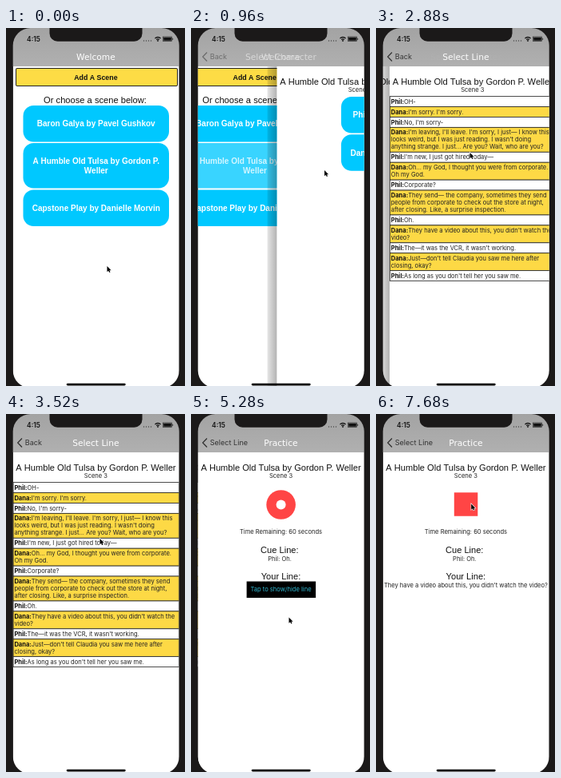
Write an HTML page with a canvas that moves like this. It is 224 by 448 pixels and loops after 8 s.

```html
<!DOCTYPE html>
<html lang="en">
<head>
<meta charset="utf-8">
<title>Line practice app</title>
<style>
  html, body { margin: 0; width: 100%; height: 100%; overflow: hidden; background: #1b1919; }
  canvas { display: block; width: 224px; height: 448px; }
</style>
</head>
<body>
<canvas id="stage"></canvas>
<script>
const LOOP = 8000, W = 224, H = 448;
const SCREEN = { x: 8.7, y: 0, w: 208, h: 450.5, r: 22 };
const HEADER_BOTTOM = 48, MID = 112.4;
const SANS = '"Liberation Sans", Arial, sans-serif';
const SYSTEM = 'Inter, sans-serif';
const TITLE = '"DejaVu Sans", Verdana, sans-serif';
const BLUE = '#00c8ff', YELLOW = '#fdd945', RED = '#ff4545', INK = '#111', BEZEL = '#1b1919';
const BODY = 7.55;

const PLAY = 'A Humble Old Tulsa by Gordon P. Weller';
const LINES = [
  ['Phil', 'OH-'],
  ['Dana', "I'm sorry. I'm sorry."],
  ['Phil', "No, I'm sorry-"],
  ['Dana', "I'm leaving, I'll leave. I'm sorry, I just— I know this|looks weird, but I was just reading. I wasn't doing|anything strange. I just... Are you? Wait, who are you?"],
  ['Phil', "I'm new, I just got hired today—"],
  ['Dana', 'Oh... my God, I thought you were from corporate.|Oh my God.'],
  ['Phil', 'Corporate?'],
  ['Dana', 'They send— the company, sometimes they send|people from corporate to check out the store at night,|after closing. Like, a surprise inspection.'],
  ['Phil', 'Oh.'],
  ['Dana', "They have a video about this, you didn't watch the|video?"],
  ['Phil', "The—it was the VCR, it wasn't working."],
  ['Dana', "Just—don't tell Claudia you saw me here after|closing, okay?"],
  ['Phil', "As long as you don't tell her you saw me."]
];

const canvas = document.getElementById('stage');
const ctx = canvas.getContext('2d');
const ratio = window.devicePixelRatio || 1;
canvas.width = W * ratio;
canvas.height = H * ratio;

const clamp = v => Math.min(1, Math.max(0, v));
const smooth = v => v * v * (3 - 2 * v);

// Cubic bezier easing, solved by bisection
function slideEase(x) {
  if (x <= 0 || x >= 1) return clamp(x);
  const curve = (u, a, b) => 3 * (1 - u) ** 2 * u * a + 3 * (1 - u) * u * u * b + u ** 3;
  let lo = 0, hi = 1;
  for (let i = 0; i < 24; i++) {
    const mid = (lo + hi) / 2;
    if (curve(mid, 0.2833, 0.3183) < x) lo = mid; else hi = mid;
  }
  return curve(lo, 0.99, 0.99);
}

// Opacity of a touchable held between down and up
function touch(t, down, up) {
  const held = smooth(clamp((t - down) / 150));
  const freed = smooth(clamp((t - up) / 250));
  return 1 - 0.77 * held * (1 - freed);
}

function faded(alpha, draw) {
  ctx.save();
  ctx.globalAlpha *= alpha;
  draw();
  ctx.restore();
}

// Draws vertically centred text and returns its width
function text(str, x, cy, size, { color = INK, align = 'center', weight = 400, font = SANS } = {}) {
  ctx.font = `${weight} ${size}px ${font}`;
  ctx.textAlign = align;
  ctx.fillStyle = color;
  ctx.fillText(str, x, cy + size * 0.35);
  return ctx.measureText(str).width;
}

function bodyText(str, x, cy, style) {
  return text(str, x, cy, BODY, { color: '#222', font: SYSTEM, ...style });
}

function box(x, y, w, h, r, color) {
  ctx.beginPath();
  ctx.roundRect(x, y, w, h, r);
  ctx.fillStyle = color;
  ctx.fill();
}

function disc(x, y, r, color) {
  ctx.beginPath();
  ctx.arc(x, y, r, 0, 7);
  ctx.fillStyle = color;
  ctx.fill();
}

function blueButton(x, y, w, h, labels, alpha = 1) {
  faded(alpha, () => {
    box(x, y, w, h, 13, BLUE);
    labels.forEach((label, i) =>
      text(label, x + w / 2, y + h / 2 + (i - (labels.length - 1) / 2) * 11.5, 10, { color: '#fff', weight: 700 }));
  });
}

function sceneTitle() {
  text(PLAY, MID, 67.5, 11.1);
  bodyText('Scene 3', MID, 77.8);
}

function welcomePage(t) {
  box(12, 50, 203, 23, 2, '#222');
  box(13, 51, 201, 21, 1, '#fddc45');
  text('Add A Scene', MID, 61.5, 8.8, { weight: 700 });
  text('Or choose a scene below:', 111.5, 90, 11.15);
  blueButton(21.5, 97, 182.5, 45.5, ['Baron Galya by Pavel Gushkov']);
  blueButton(21.5, 144, 182.5, 56.5, ['A Humble Old Tulsa by Gordon P.', 'Weller'], touch(t, 540, 800));
  blueButton(21.5, 202.5, 182.5, 45.5, ['Capstone Play by Danielle Morvin']);
}

function characterPage(t) {
  sceneTitle();
  blueButton(89, 86, 47.5, 45.5, ['Phil']);
  blueButton(89, 133.3, 47.5, 45.5, ['Dana'], touch(t, 2400, 2580));
}

function linePage() {
  sceneTitle();
  let y = 85.6;
  for (const [name, speech] of LINES) {
    const parts = speech.split('|');
    const height = parts.length * 9 + 3.92;
    ctx.fillStyle = name === 'Dana' ? YELLOW : '#fff';
    ctx.fillRect(SCREEN.x, y, SCREEN.w, height);
    ctx.strokeStyle = '#222';
    ctx.lineWidth = 0.8;
    ctx.strokeRect(SCREEN.x + 0.4, y, SCREEN.w - 0.8, height);
    const left = 10.4, middle = y + 6.46;
    const nameWidth = bodyText(name + ':', left, middle, { align: 'left', weight: 700, color: INK });
    parts.forEach((part, i) =>
      bodyText(part, left + (i ? 0 : nameWidth), middle + i * 9, { align: 'left' }));
    y += height;
  }
}

function practicePage(t) {
  sceneTitle();
  faded(touch(t, 7200, 7400), () => {
    if (t < 7440) {
      disc(112.5, 113.5, 18.3, RED);
      disc(112.5, 113.5, 6, '#fff');
    } else {
      box(97.8, 98.3, 29.5, 29.5, 0, RED);
    }
  });
  bodyText('Time Remaining: 60 seconds', MID, 147.8);
  text('Cue Line:', 110.7, 170, 11.1);
  bodyText('Phil: Oh.', 110.9, 181);
  text('Your Line:', MID, 203, 11.1);
  if (t < 5840) {
    faded(touch(t, 5700, 5840), () => {
      box(69.5, 209.5, 86.5, 20.5, 0, '#000');
      bodyText('Tap to show/hide line', MID, 219.7, { color: '#2fb6cf' });
    });
  } else {
    bodyText("They have a video about this, you didn't watch the video?", MID, 214.7);
  }
}

const PAGES = [
  { title: 'Welcome', draw: welcomePage, start: -1000 },
  { title: 'Select Character', back: 'Back', draw: characterPage, start: 880 },
  { title: 'Select Line', back: 'Back', draw: linePage, start: 2625 },
  { title: 'Practice', back: 'Select Line', draw: practicePage, start: 4800 }
];

function card(page, offset, t) {
  ctx.save();
  ctx.translate(offset, 0);
  if (offset > 0 && offset < SCREEN.w) {
    const edge = ctx.createLinearGradient(SCREEN.x - 12, 0, SCREEN.x, 0);
    edge.addColorStop(0, 'rgba(0,0,0,0.1)');
    edge.addColorStop(1, 'rgba(0,0,0,0.3)');
    ctx.fillStyle = edge;
    ctx.fillRect(SCREEN.x - 12, HEADER_BOTTOM, 12, H);
  }
  ctx.fillStyle = '#fff';
  ctx.fillRect(SCREEN.x, HEADER_BOTTOM, SCREEN.w, H);
  page.draw(t);
  ctx.restore();
}

function heading(page, alpha) {
  faded(alpha, () => {
    text(page.title, MID, 36.5, 10.65, { color: '#fff', font: TITLE });
    if (!page.back) return;
    ctx.beginPath();
    ctx.moveTo(20, 30.5);
    ctx.lineTo(14.7, 36);
    ctx.lineTo(20, 41.5);
    ctx.strokeStyle = '#333';
    ctx.lineWidth = 1.3;
    ctx.stroke();
    text(page.back, 23.7, 36.2, 9.1, { align: 'left', font: SYSTEM, color: '#333' });
  });
}

function statusBar() {
  text('4:15', 34.5, 13.7, 8.3, { weight: 600, font: SYSTEM });
  for (let i = 0; i < 4; i++) disc(172.5 + i * 3, 16, 0.7, '#444');
  ctx.strokeStyle = INK;
  ctx.lineWidth = 1.3;
  for (const r of [2.6, 5]) {
    ctx.beginPath();
    ctx.arc(190, 16.5, r, -Math.PI * 0.75, -Math.PI * 0.25);
    ctx.stroke();
  }
  disc(190, 16, 0.9, INK);
  ctx.lineWidth = 0.6;
  ctx.strokeRect(196.5, 11, 11, 5.5);
  box(197.2, 11.7, 9.6, 4.1, 0.5, INK);
  box(208.3, 12.8, 0.8, 2, 0.3, INK);
}

function header(from, to, progress) {
  const gray = ctx.createLinearGradient(0, 0, 0, HEADER_BOTTOM);
  gray.addColorStop(0, '#a3a3a3');
  gray.addColorStop(1, '#b0b0b0');
  ctx.fillStyle = gray;
  ctx.fillRect(0, SCREEN.y, W, HEADER_BOTTOM - SCREEN.y);
  if (progress < 1) heading(from, 1 - progress);
  heading(to, progress);
  statusBar();
}

const POINTER = [
  [80, 126.5, 298], [540, 167, 178], [960, 167, 178], [1500, 169.5, 170.5],
  [1840, 169.5, 170.5], [2400, 117.5, 156], [3560, 117.5, 156], [4400, 122.5, 254.5],
  [5320, 122.5, 254.5], [5700, 118, 217], [6360, 118, 217], [6760, 164, 165], [7160, 119.2, 112.5]
];

function pointer(t) {
  let i = POINTER.findIndex(p => p[0] > t);
  if (i < 0) i = POINTER.length - 1;
  const a = POINTER[Math.max(0, i - 1)], b = POINTER[i];
  const k = smooth(clamp((t - a[0]) / (b[0] - a[0] || 1)));
  ctx.save();
  ctx.translate(a[1] + (b[1] - a[1]) * k, a[2] + (b[2] - a[2]) * k);
  ctx.scale(0.87, 0.87);
  const arrow = new Path2D('M0 0V8.2L1.9 6.5L3.2 9.3L4.6 8.7L3.4 6H5.9Z');
  ctx.strokeStyle = '#fff';
  ctx.lineWidth = 1.3;
  ctx.stroke(arrow);
  ctx.fillStyle = '#000';
  ctx.fill(arrow);
  ctx.restore();
}

function render(t) {
  ctx.setTransform(ratio, 0, 0, ratio, 0, 0);
  ctx.fillStyle = BEZEL;
  ctx.fillRect(0, 0, W, H);

  const index = PAGES.findLastIndex(p => t >= p.start);
  const page = PAGES[index], previous = PAGES[Math.max(0, index - 1)];
  const progress = slideEase((t - page.start) / 500);

  ctx.save();
  ctx.beginPath();
  ctx.roundRect(SCREEN.x, SCREEN.y, SCREEN.w, SCREEN.h, SCREEN.r);
  ctx.clip();
  if (progress < 1) card(previous, -0.3 * SCREEN.w * progress, t);
  card(page, SCREEN.w * (1 - progress), t);
  header(previous, page, progress);
  box(54.5, -12, 116, 28.8, 10, BEZEL);
  box(75.7, 444.7, 74, 2.8, 1.4, '#000');
  ctx.restore();

  pointer(t);
}

function tick() {
  render(performance.now() % LOOP);
  requestAnimationFrame(tick);
}
tick();
</script>
</body>
</html>
```
